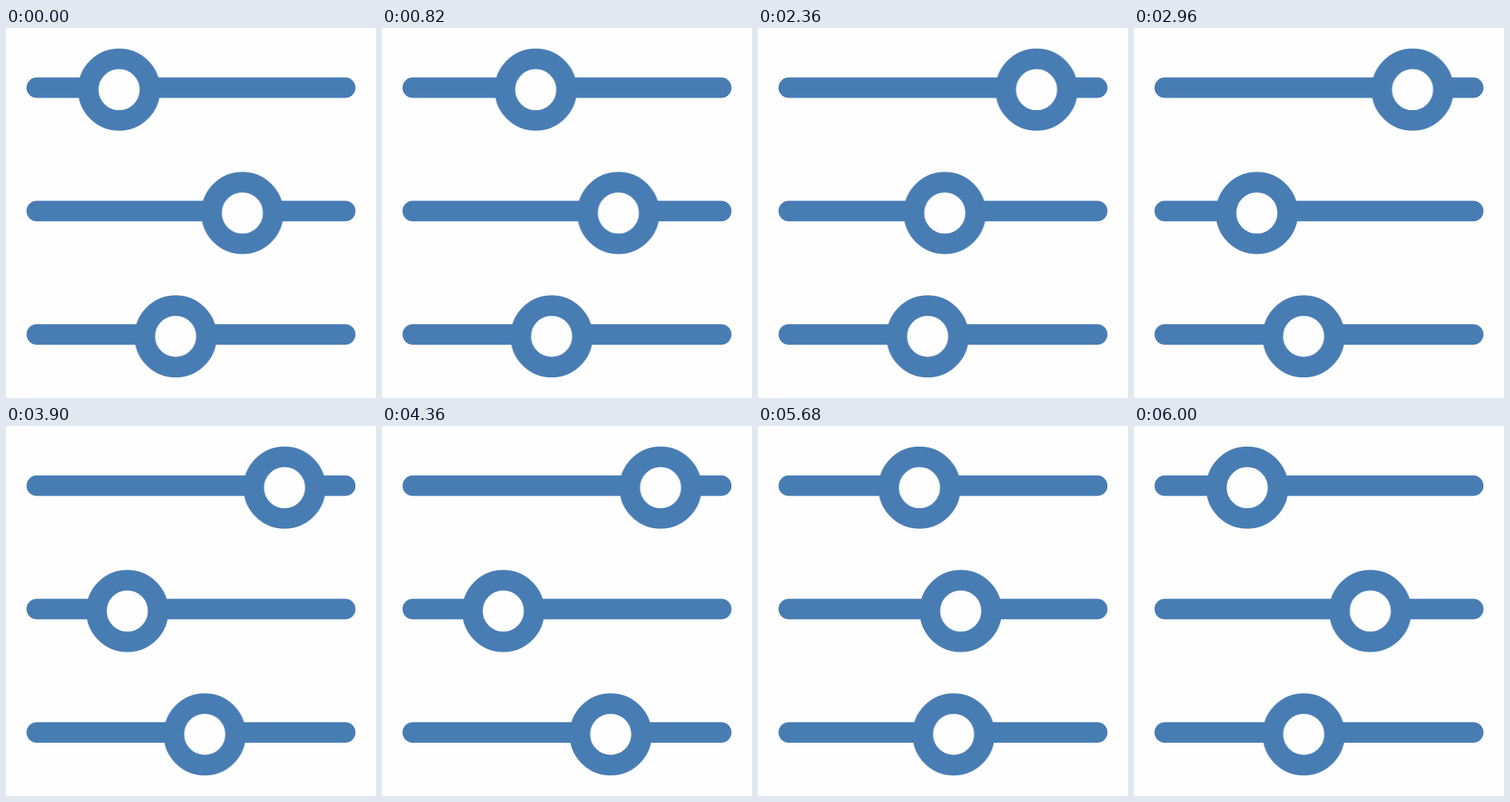
Animation of 500 by 500 pixels, one loop 6020 ms. Source, as an HTML page:

```html
<!DOCTYPE html>
<html lang="en">
<head>
<meta charset="utf-8">
<title>Sliders</title>
<style>
  html, body { margin: 0; width: 100%; height: 100%; overflow: hidden; background: #fefefe; }
  svg { display: block; width: 100vw; height: 100vh; }
  line, circle { stroke: #487db4; stroke-width: 27.75; }
  line { stroke-linecap: round; }
  circle { fill: #fefefe; }
</style>
</head>
<body>
<svg viewBox="0 0 500 500"></svg>
<script>
  const LOOP = 6020;
  const svg = document.querySelector('svg');

  // Each move runs from one time to another (ms) with its own bezier.
  const sliders = [
    { y: 83.3, from: 152.8, to: 376.4,
      out: [410, 1580, '.61, 0, .22, 1'], back: [5183, 6017, '.333, 0, .565, 1'] },
    { y: 250, from: 319.4, to: 163.9,
      out: [2010, 3170, '.49, 0, .03, 1'], back: [5183, 6017, '.333, 0, .565, 1'] },
    { y: 416.7, from: 229.2, to: 308.2,
      out: [3590, 4410, '.626, 0, .09, 1.18'], back: [5183, 6010, '.3, 0, .858, 1'] }
  ];

  function add(tag, attrs) {
    const el = document.createElementNS('http://www.w3.org/2000/svg', tag);
    for (const name in attrs) el.setAttribute(name, attrs[name]);
    return svg.appendChild(el);
  }

  function key(time, x, curve) {
    return {
      offset: time / LOOP,
      transform: `translateX(${x}px)`,
      easing: curve ? `cubic-bezier(${curve})` : 'linear'
    };
  }

  for (const { y, from, to, out, back } of sliders) {
    const lineY = y - 2.6;
    add('line', { x1: 41.6, x2: 458.4, y1: lineY, y2: lineY });
    add('circle', { cy: y, r: 41.65 }).animate([
      key(0, from),
      key(out[0], from, out[2]),
      key(out[1], to),
      key(back[0], to, back[2]),
      key(back[1], from),
      key(LOOP, from)
    ], { duration: LOOP, iterations: Infinity });
  }
</script>
</body>
</html>
```
